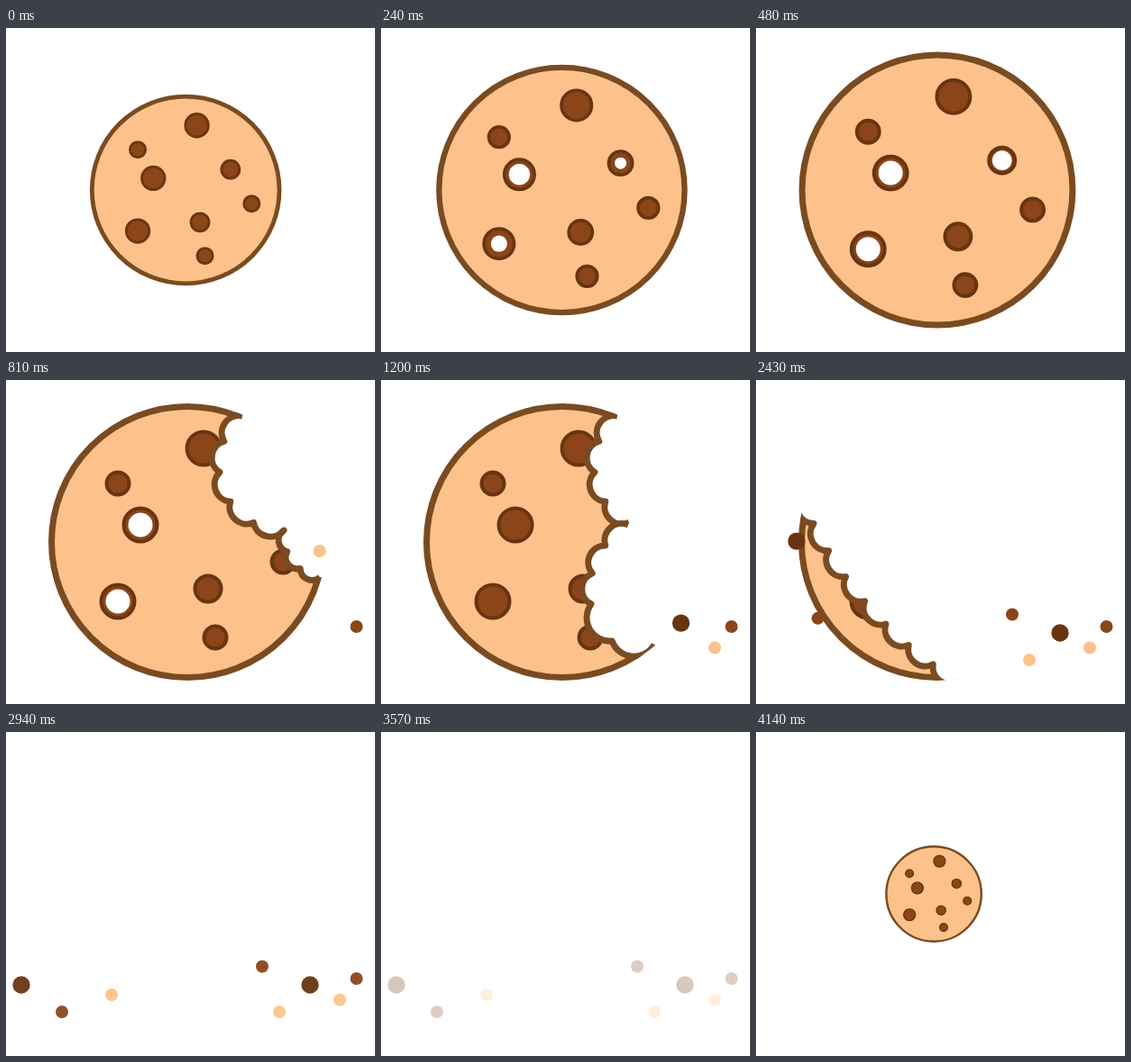
Write an HTML page with a canvas that moves like this. It is 409 px wide and 360 px high and loops after 4170 ms.

```html
<!DOCTYPE html>
<html lang="en">
<head>
<meta charset="utf-8">
<title>Cookie bites</title>
<style>
html, body { margin: 0; width: 409px; height: 360px; overflow: hidden; background: #fff; }
canvas { display: block; }
</style>
</head>
<body>
<canvas id="stage" width="409" height="360"></canvas>
<script>
const ctx = document.getElementById('stage').getContext('2d');
const LOOP = 4170, GONE = 2460, REGROW = 4020, CLEAR = 3720;
const DOUGH = '#fdc28b', RIM = '#7a4b21', CHIP = '#8b4519', DARK = '#683510';

// x, y from the cookie's centre, and radius; the first three turn hollow for a while
const chips = [
  [-52, -19, 20.5], [-77, 66, 20.5], [72, -33, 16.5], [18, -104, 20.5],
  [23, 52, 16.5], [106, 22, 14.5], [-77, -65, 14.5], [31, 106, 14.5]
];

// start time, start point, then bows: end x, end y, depth, scallops
const bites = [
  makeBite(510, 262, 40, [308, 167, 47, 5], [348, 219, 13, 3]),
  makeBite(915, 274, 161, [233, 249, 15, 3], [303, 294, 22, 2]),
  makeBite(1530, 160, 33, [184, 97, 5, 3], [206, 212, 47, 4], [279, 313, 10, 3]),
  makeBite(2050, 50, 128, [225, 335, 22, 8])
];

// landing x, y, launch time, sideways drift, colour
const crumbs = [
  [388.5, 274, 510, 45, CHIP], [370, 297.5, 750, 28, DOUGH],
  [337, 281, 915, 90, DARK], [303, 311, 1320, 25, DOUGH],
  [284, 260.5, 1914, 3, CHIP], [117, 292, 2050, -30, DOUGH],
  [62, 311, 2200, -28, CHIP], [17, 281, 2340, -40, DARK]
];

// Scallops hang between cusps spaced evenly along circular bows.
function makeBite(at, startX, startY, ...bows) {
  let x = startX, y = startY, d = `M${x} ${y}`;
  for (const [endX, endY, depth, count] of bows) {
    const chord = Math.hypot(endX - x, endY - y);
    const ux = (endX - x) / chord, uy = (endY - y) / chord;
    const half = 2 * Math.atan(2 * depth / chord);
    const radius = chord / 2 / Math.sin(half);
    const midX = (x + endX) / 2, midY = (y + endY) / 2;
    const step = 2 * radius * Math.sin(half / count);
    for (let i = 1; i <= count; i++) {
      const angle = half * (2 * i / count - 1);
      const along = radius * Math.sin(angle);
      const out = radius * (Math.cos(angle) - Math.cos(half));
      d += `A${step * .55} ${step * .55} 0 0 0 ${midX + ux * along - uy * out} ${midY + uy * along + ux * out}`;
    }
    [x, y] = [endX, endY];
  }
  return { at, edge: new Path2D(d), area: new Path2D(`${d}L430 ${y}V-20H${startX}Z`) };
}

function disc(x, y, r, fill, line, width) {
  ctx.beginPath();
  ctx.arc(x, y, r, 0, Math.PI * 2);
  ctx.fillStyle = fill;
  ctx.fill();
  if (line) {
    ctx.strokeStyle = line;
    ctx.lineWidth = width;
    ctx.stroke();
  }
}

function cookieScale(t) {
  if (t >= REGROW) return .35 * (t - REGROW) / 120;
  return t < 540 ? 1 - .31 * (1 - t / 540) ** 2 : 1;
}

function drawCookie(t) {
  const s = cookieScale(t);
  ctx.save();
  ctx.translate(195 + 6 * s, 180);
  ctx.scale(s, s);
  disc(0, 0, 150.5, DOUGH, RIM, 7);
  chips.forEach(([x, y, r], i) => {
    disc(x, y, r - 2, CHIP, DARK, 4);
    const open = (t - 60 - 40 * i) * .072;
    if (i < 3 && open > 0 && t < bites[1].at) disc(x, y, Math.min(r * .66, open), '#fff');
  });
  ctx.restore();
}

function drawBites(t) {
  for (const { at, edge, area } of bites) {
    if (t < at) break;
    ctx.fillStyle = '#fff';
    ctx.fill(area);
    ctx.save();
    ctx.beginPath();
    ctx.arc(201, 180, 154, 0, Math.PI * 2);
    ctx.clip();
    ctx.strokeStyle = RIM;
    ctx.lineWidth = 7;
    ctx.lineJoin = 'round';
    ctx.stroke(edge);
    ctx.restore();
  }
}

function drawCrumbs(t) {
  const fade = Math.max(0, (t - 2700) / (CLEAR - 2700));
  ctx.globalAlpha = 1 - fade * fade;
  for (const [x, y, at, drift, colour] of crumbs) {
    if (t < at) continue;
    const p = Math.min(1, (t - at) / 300);
    disc(x - drift * (1 - p), y - 112 * (1 - p * p), colour === DARK ? 9.7 : 7, colour);
  }
  ctx.globalAlpha = 1;
}

function draw(now) {
  const t = now % LOOP;
  ctx.fillStyle = '#fff';
  ctx.fillRect(0, 0, 409, 360);
  if (t < GONE || t > REGROW) drawCookie(t);
  if (t < GONE) drawBites(t);
  if (t < CLEAR) drawCrumbs(t);
}

let begin;
function tick(now) {
  begin ??= now;
  draw(now - begin);
  requestAnimationFrame(tick);
}
draw(0);
requestAnimationFrame(tick);
</script>
</body>
</html>
```
